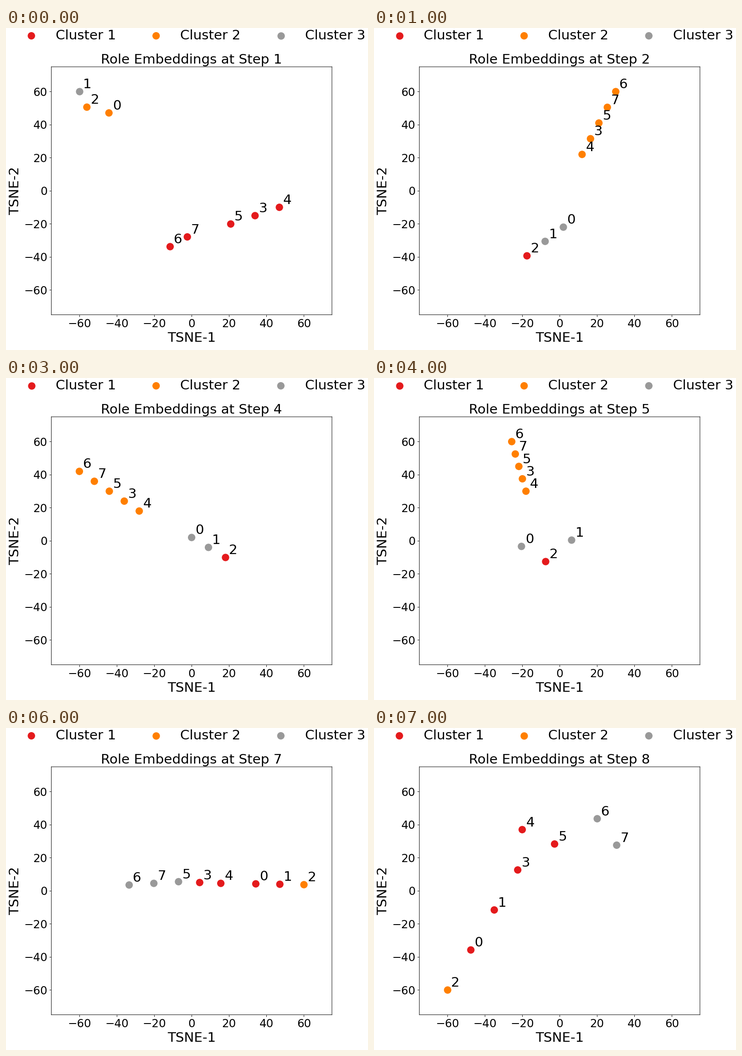
Recreate the animation shown at these times as a matplotlib script. Size 794 by 706 pixels, loop 8000 ms.

```python
import matplotlib.pyplot as plt
import numpy as np
from matplotlib.animation import FuncAnimation

W, H, DPI = 794, 706, 88.25
COLORS = {"1": "#e41a1c", "2": "#ff7f00", "3": "#999999"}

# Cluster of each role 0-7, per step
CLUSTERS = ["23211111"] + ["33122222"] * 5 + ["11211333", "11211133"]

# Roles line up in chains; each chain is spread evenly along a few key points
CHAINS = [
    {"120": [(-60, 60), (-56, 50.6), (-44.2, 47.1)],
     "67": [(-11.5, -33.8), (-2.3, -27.9)],
     "534": [(20.9, -20.1), (46.9, -10)]},
    {"012": [(2, -22), (-17.5, -39.2)],
     "67534": [(30, 60), (12, 22)]},
    {"012": [(-0.2, -42.5), (-4.7, -60)],
     "6734": [(35.8, 37.7), (24.9, 21.1), (21, 5)],
     "5": [(-0.7, 13.7)]},
    {"012": [(0, 2), (18, -10)],
     "67534": [(-60, 42), (-28, 18)]},
    {"021": [(-20.4, -3.4), (-7.5, -12.4), (6.4, 0.4)],
     "67534": [(-25.6, 60), (-18, 30)]},
    {"012": [(1.3, 2), (-0.7, -12.2), (-11.1, -13.1)],
     "67534": [(60, 41.8), (27, 16.8)]},
    {"67534": [(-33.4, 3.5), (-7, 5.5), (15.6, 4.5)],
     "012": [(34.3, 4.2), (60, 3.7)]},
    {"2013": [(-60, -60), (-22.4, 12.6)],
     "45": [(-20, 37), (-2.7, 28.3)],
     "67": [(20.1, 43.6), (30.5, 27.6)]},
]


def place(chains):
    """Return {role: (x, y)} for one step."""
    spots = {}
    for roles, keys in chains.items():
        t = np.linspace(0, 1, len(roles))
        knots = np.linspace(0, 1, len(keys))
        xs, ys = (np.interp(t, knots, axis) for axis in zip(*keys))
        spots.update(zip(map(int, roles), zip(xs, ys)))
    return spots


plt.rcParams["font.family"] = "DejaVu Sans"
fig, ax = plt.subplots(figsize=(W / DPI, H / DPI), dpi=DPI)
fig.subplots_adjust(left=99.4 / W, right=714.9 / W,
                    bottom=1 - 628.7 / H, top=1 - 85.1 / H)


def draw(step):
    spots = place(CHAINS[step])
    ax.clear()
    for name, color in COLORS.items():
        members = [p for r, p in spots.items() if CLUSTERS[step][r] == name]
        xs, ys = zip(*members)
        ax.scatter(xs, ys, s=150, c=[color] * len(xs), label=f"Cluster {name}")
    for role, (x, y) in spots.items():
        ax.text(x + 2, y + 2, str(role), fontsize=24)

    ticks = range(-60, 61, 20)
    ax.set(xlim=(-75, 75), ylim=(-75, 75), xticks=ticks, yticks=ticks)
    ax.tick_params(labelsize=20)
    for spine in ax.spines.values():
        spine.set_snap(False)
    ax.set_title(f"Role Embeddings at Step {step + 1}", fontsize=24)
    ax.set_xlabel("TSNE-1", fontsize=24)
    ax.set_ylabel("TSNE-2", fontsize=24)
    ax.legend(loc="upper center", bbox_to_anchor=(0.5, 1.2), ncol=3,
              fontsize=24, frameon=False)
    return []


anim = FuncAnimation(fig, draw, frames=len(CHAINS), init_func=lambda: draw(0),
                     interval=1000, repeat=True, repeat_delay=0)
plt.show()
```
